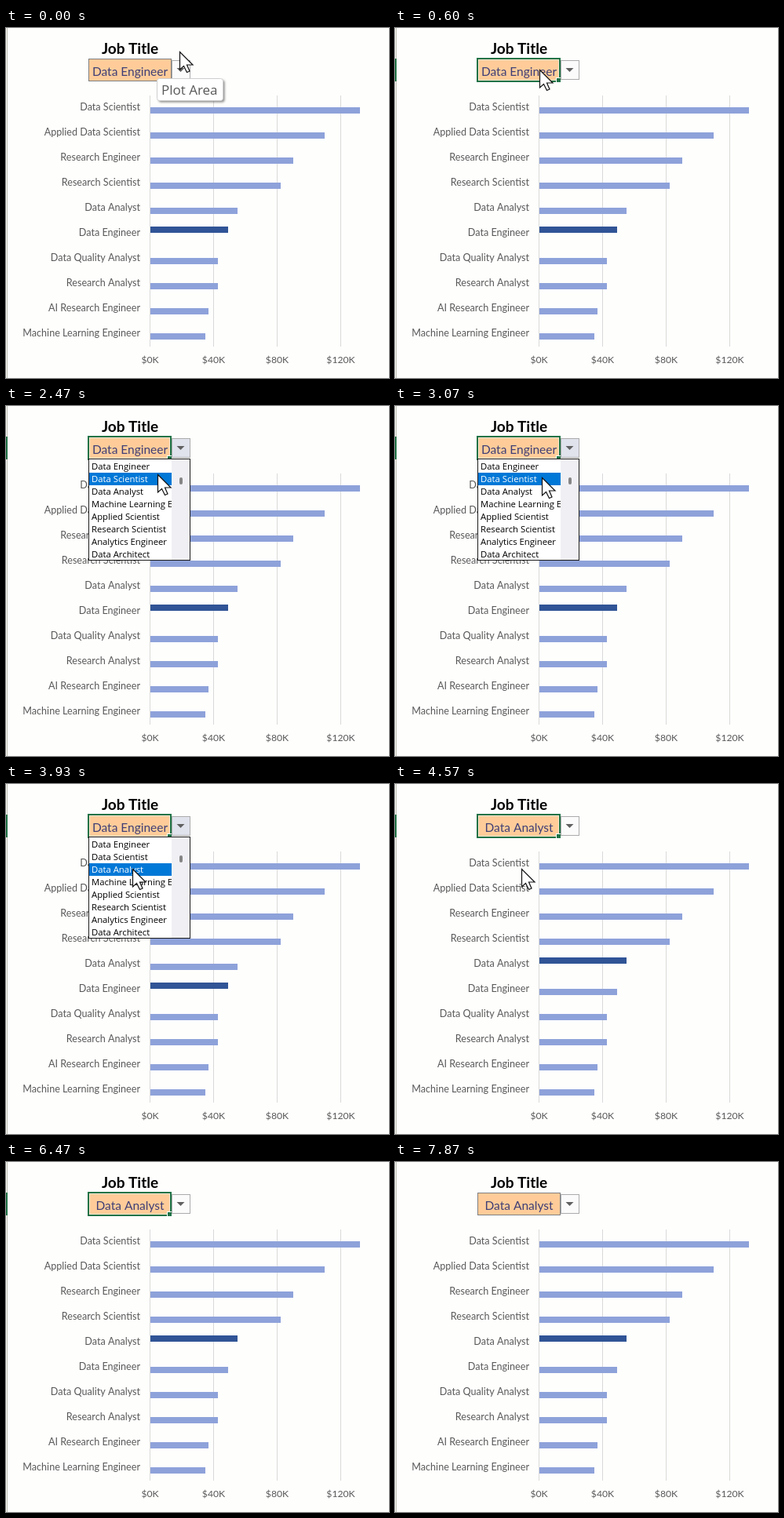
Animation of 488 by 446 pixels, one loop 7900 ms. Source, as an HTML page with a canvas:

```html
<!DOCTYPE html>
<html lang="en">
<head>
<meta charset="utf-8">
<title>Salary by job title</title>
<style>
  html, body { margin: 0; width: 100%; height: 100%; overflow: hidden; background: #fefefd; }
  canvas { display: block; }
</style>
</head>
<body>
<canvas id="stage" width="488" height="446"></canvas>
<script>
const ctx = document.getElementById('stage').getContext('2d');
const LOOP = 7900;
const T = { tipOff: 200, select: 600, open: 1750, pick: 4150, hide: 4900, deselect: 7550 };

const LABEL_FONT = 'Lato, "Open Sans", sans-serif';
const UI_FONT = '"Open Sans", "Noto Sans", sans-serif';
const PAPER = '#fefefd';
const GREEN = '#217346';
const INK = '#595959';

// label and bar end in px
const bars = [
  ['Data Scientist', 451], ['Applied Data Scientist', 406], ['Research Engineer', 366],
  ['Research Scientist', 350], ['Data Analyst', 295], ['Data Engineer', 283],
  ['Data Quality Analyst', 270], ['Research Analyst', 270],
  ['AI Research Engineer', 258], ['Machine Learning Engineer', 254]
];
const options = ['Data Engineer', 'Data Scientist', 'Data Analyst', 'Machine Learning Engineer',
  'Applied Scientist', 'Research Scientist', 'Analytics Engineer', 'Data Architect'];

// pointer stops: time, x, y
const path = [
  [0, 222, 30], [150, 222, 30], [520, 185, 53], [750, 185, 53], [1250, 230, 52],
  [1900, 230, 52], [2380, 194, 87], [2900, 194, 87], [3500, 162, 108], [LOOP, 162, 108]
];

function pointerAt(t) {
  const i = path.findIndex(p => p[0] > t);
  const [t0, x0, y0] = path[i - 1], [t1, x1, y1] = path[i];
  const u = (t - t0) / (t1 - t0), e = u * u * (3 - 2 * u);
  return { x: Math.round(x0 + (x1 - x0) * e), y: Math.round(y0 + (y1 - y0) * e) };
}

function rect(x, y, w, h, fill) {
  ctx.fillStyle = fill;
  ctx.fillRect(x, y, w, h);
}

function frame(x, y, w, h, color) {
  ctx.strokeStyle = color;
  ctx.lineWidth = 1;
  ctx.strokeRect(x + 0.5, y + 0.5, w - 1, h - 1);
}

function text(s, x, y, font, color, align = 'left') {
  ctx.font = font;
  ctx.fillStyle = color;
  ctx.textAlign = align;
  ctx.fillText(s, x, y);
}

function polygon(points, fill) {
  ctx.beginPath();
  points.forEach(([x, y]) => ctx.lineTo(x, y));
  ctx.closePath();
  ctx.fillStyle = fill;
  ctx.fill();
}

function drawChart(job) {
  for (let i = 0; i < 4; i++) {
    const x = 183 + i * 81;
    rect(x, 86, 1, 320, '#d9d9d9');
    text(`$${i * 40}K`, x + 0.5, 427, `12.2px ${LABEL_FONT}`, INK, 'center');
  }
  bars.forEach(([name, end], i) => {
    const y = 101 + i * 32, on = name === job;
    text(name, 171, y + 4, `12.6px ${LABEL_FONT}`, INK, 'right');
    rect(184, on ? y - 8 : y, end - 184, 8, on ? '#305496' : '#8ea2da');
  });
}

function drawCell(job, selected, hot) {
  text('Job Title', 158, 33, `bold 19px ${LABEL_FONT}`, '#000', 'center');
  rect(105, 39, 106, 29, '#ffcc99');
  if (selected) {
    rect(0, 39, 2, 29, GREEN);
    ctx.strokeStyle = GREEN;
    ctx.lineWidth = 2;
    ctx.strokeRect(105, 39, 105, 29);
    frame(106, 40, 103, 27, '#ffe8d2');
    rect(205, 63, 7, 7, PAPER);
    rect(206, 64, 5, 5, GREEN);
  } else {
    frame(105, 39, 106, 29, '#7f7f7f');
  }
  text(job, 158, 61, `15.5px ${LABEL_FONT}`, '#3f3f76', 'center');

  rect(212, 41, 23, 25, hot ? '#e0e3ec' : '#fbfbfb');
  frame(211, 41, 24, 25, '#ababab');
  polygon([[217.5, 51], [227.5, 51], [222.5, 56]], '#606060');
}

function drawList(row) {
  rect(105, 67, 130, 130, '#fff');
  rect(211, 68, 23, 128, '#f0f0f4');
  ctx.beginPath();
  ctx.roundRect(221, 91, 4, 9, 2);
  ctx.fillStyle = '#858585';
  ctx.fill();
  ctx.save();
  ctx.beginPath();
  ctx.rect(106, 68, 105, 128);
  ctx.clip();
  options.forEach((name, i) => {
    const y = 69 + i * 16;
    if (i === row) rect(106, y, 105, 16, '#0078d7');
    text(name, 109, y + 12, `11.3px ${UI_FONT}`, i === row ? '#fff' : '#000');
  });
  ctx.restore();
  frame(105, 67, 130, 130, '#1c1c1c');
}

function drawTip() {
  ctx.save();
  ctx.shadowColor = 'rgba(60,60,60,.6)';
  ctx.shadowBlur = 3;
  ctx.shadowOffsetX = ctx.shadowOffsetY = 2;
  ctx.beginPath();
  ctx.roundRect(192.5, 64.5, 84, 28, 3);
  ctx.fillStyle = '#fff';
  ctx.fill();
  ctx.restore();
  ctx.strokeStyle = '#cfcfcf';
  ctx.lineWidth = 1;
  ctx.stroke();
  text('Plot Area', 198, 85, `17px ${UI_FONT}`, INK);
}

function drawPointer({ x, y }) {
  ctx.save();
  ctx.translate(x - 0.5, y + 0.5);
  polygon([[0, 0], [0, 22.5], [5, 18], [9, 26], [12.5, 24.5], [9, 16.5], [16.5, 16.5]], '#fff');
  ctx.strokeStyle = '#111';
  ctx.lineWidth = 1.2;
  ctx.stroke();
  ctx.restore();
}

function draw(t) {
  const pointer = pointerAt(t);
  const open = t >= T.open && t < T.pick;
  const job = t < T.pick ? 'Data Engineer' : 'Data Analyst';
  const selected = t >= T.select && t < T.deselect;
  const over = pointer.x >= 211 && pointer.y >= 41 && pointer.y < 67;

  rect(0, 0, 488, 446, PAPER);
  rect(1, 0, 1, 446, '#bdbdb0');
  drawChart(job);
  drawCell(job, selected, open || over);
  if (open) drawList(Math.max(0, Math.floor((pointer.y - 69) / 16)));
  if (t < T.tipOff) drawTip();
  if (t < T.hide) drawPointer(pointer);
}

const start = performance.now();
function tick(now) {
  draw(Math.max(0, now - start) % LOOP);
  requestAnimationFrame(tick);
}
draw(0);
requestAnimationFrame(tick);
</script>
</body>
</html>
```
